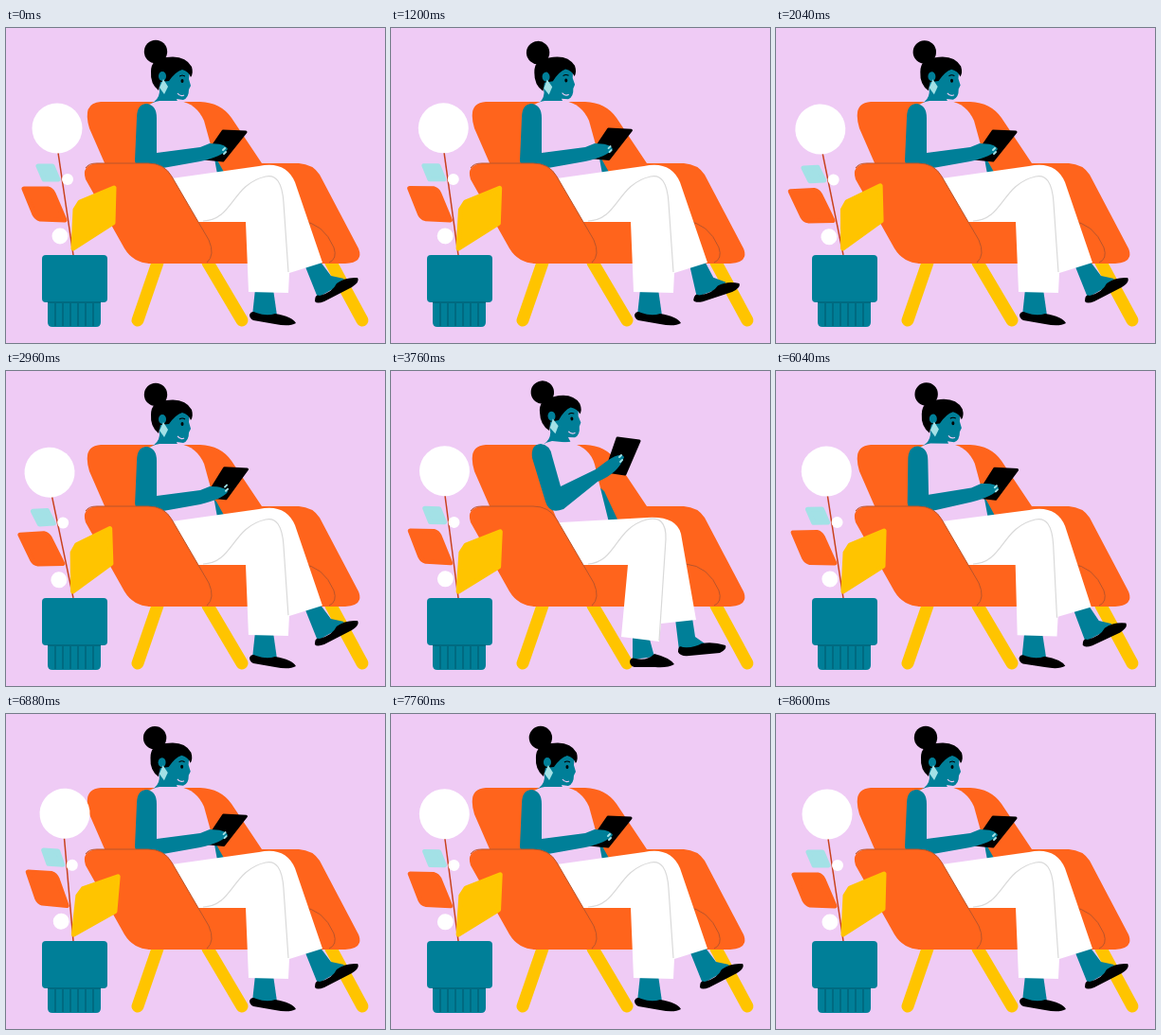
These frames come from a looping animation (400 px wide and 333 px high, 8640 ms). An HTML page:

```html
<!DOCTYPE html>
<html lang="en">
<head>
<meta charset="utf-8">
<title>Reading in an armchair</title>
<style>
  html, body { margin: 0; width: 100%; height: 100%; overflow: hidden; background: #efcbf5; }
  svg { display: block; width: 100vw; height: 100vh; }
  .orange { fill: #ff641c; }
  .teal { fill: #007f98; }
  .yellow { fill: #ffc400; }
  .lilac { fill: #efcbf5; }
  .pale { fill: #a3e1e6; }
  .white { fill: #fff; }
  .line { fill: none; stroke: #b9542b; stroke-width: 1; }
  .leaf { stroke-width: 5; stroke-linejoin: round; }
  .leg { fill: none; stroke: #ffc400; stroke-width: 13; stroke-linecap: round; }
</style>
</head>
<body>
<svg viewBox="0 0 400 333">
  <path class="leg" d="M160 248L139 309M213 248L249 309M343 248L376 309"/>
  <path class="orange" d="M100 78H205Q227 79 238 95L270 143H309Q324 144 331 155L372 233Q378 248 358 249H150L105 145L88 106Q80 79 100 78Z"/>
  <path class="line" d="M205 204H311Q335 206 346 232Q350 244 341 248"/>

  <path id="farArm" class="teal"/>
  <g id="upper">
    <g id="head">
      <circle cx="158" cy="25" r="12.2"/>
      <path class="teal" d="M161 48L162 68Q161 76 153 80H182L180 75L187 76Q193 74 193 65L195 61L193 54L194 44L175 38Z"/>
      <path d="M153 46Q153 32 169 31Q189 28 196 41Q198 48 195 52Q193 46 186 44Q179 46 172 56L163 57L161 66Q152 59 153 46Z"/>
      <ellipse class="teal" cx="165" cy="51" rx="4" ry="5"/>
      <ellipse cx="186" cy="56" rx="1.5" ry="2"/>
      <path d="M183 51Q186 49 189 51" fill="none" stroke="#000"/>
      <path d="M181 69Q184 73 188 71" fill="none" stroke="#efcbf5" stroke-width="1.2"/>
      <path class="pale" d="M166 54L171 62L167 70L162 63Z"/>
    </g>
    <path id="shirt" class="lilac"/>
  </g>

  <path id="nearAnkle" class="teal"/>
  <path id="nearShoe"/>
  <g id="foot">
    <path id="farAnkle" class="teal"/>
    <path id="farShoe"/>
  </g>
  <path id="pants" class="white"/>
  <path id="crease" fill="none" stroke="#d9d9d9" stroke-width="1.2"/>

  <g id="reach">
    <path id="tablet" stroke="#000" stroke-width="3" stroke-linejoin="round"/>
    <path id="arm" class="teal"/>
    <path id="nails" fill="none" stroke="#a3e1e6" stroke-width="2" stroke-linecap="round"/>
  </g>

  <path class="orange" d="M96 143H150Q167 143 175 157L214 224Q223 246 205 249H152Q134 248 125 233L84 160Q79 145 96 143Z"/>
  <path class="line" d="M84 148Q87 143 96 143H150Q167 143 175 157L214 224Q221 240 212 248"/>

  <g id="plant">
    <path d="M71 240L54 125" fill="none" stroke="#c8411c" stroke-width="1.5"/>
    <circle class="white" cx="54" cy="106" r="26.5"/>
    <path class="leaf pale" stroke="#a3e1e6" d="M34 146L49 146L55 160L40 160Z"/>
    <circle class="white" cx="65" cy="160" r="6"/>
    <path id="leftLeaf" class="leaf orange" stroke="#ff641c" d="M19 170L44 170Q48 171 50 175L62 203L36 202Q32 201 30 197Z"/>
    <path id="rightLeaf" class="leaf yellow" stroke="#ffc400" d="M78 184L114 169L113 206L71 233L73 192Z"/>
    <circle class="white" cx="57" cy="220" r="8.5"/>
  </g>
  <path class="teal" d="M44 288H100V311Q100 316 95 316H49Q44 316 44 311Z"/>
  <rect class="teal" x="38" y="240" width="69" height="50" rx="4"/>
  <path d="M44 290H100M52 291V315M60 291V315M68 291V315M76 291V315M84 291V315M92 291V315" fill="none" stroke="#00566b"/>
</svg>
<script>
const LOOP = 8640, STEP = 40;
const el = id => document.getElementById(id);

// Each part: [reclined pose, upright pose]
const body = {
  shirt: ["M148 83Q155 78 162 77L183 77Q201 80 209 98L220 138L224 160L178 162L158 140Z",
          "M158 79Q164 75 170 74L190 76Q210 81 215 99L222 128L230 160L178 164L168 140Z"],
  farArm: ["M216 132L222 138L232 156L222 158Z",
           "M219 122L225 127L240 159L228 159Z"],
  arm: ["M138 95Q138 80 149 80Q159 82 159 95L159 132L205 126L215 122Q231 122 234 128Q228 136 205 141L160 149Q137 152 136 140Z",
        "M149 92Q147 78 158 77Q168 78 170 90L179 122L216 104L228 95Q243 85 246 91Q240 108 218 117L182 146Q167 152 163 138Z"],
  pants: ["M168 160L267 146Q295 140 305 163L334 248L299 259L298 280L256 279L253 205L200 205Q188 195 168 160Z",
          "M162 161L270 155Q301 153 306 172L322 263L285 267L283 286L243 281L250 205L200 205Q188 195 162 161Z"],
  crease: ["M208 204C240 203 238 165 274 157Q291 153 293 185L298 258",
           "M208 204C238 202 236 166 270 157Q291 152 290 178L283 285"],
  nearAnkle: ["M263 276L282 276L286 304L260 304Z",
              "M255 278L272 280L278 302L255 305Z"],
  nearShoe: ["M257 303Q259 298 264 301Q275 305 284 302Q302 305 306 312Q299 316 284 313L261 309Q257 307 257 303Z",
             "M252 307Q253 302 258 304Q270 307 278 299Q294 303 299 310Q292 314 279 313L257 313Q252 312 252 307Z"],
  farAnkle: ["M315 250L331 246L343 262L357 265L350 273L329 285Z",
             "M300 262L318 261L321 281L331 288L322 293L304 295Z"],
  farShoe: ["M326 289Q326 281 331 283Q345 279 349 270Q358 263 371 264Q374 268 365 274L336 289Q328 292 326 289Z",
            "M303 297Q303 289 308 292Q320 293 328 288Q340 286 353 290Q355 294 347 298L315 301Q305 302 303 297Z"]
};
const device = {
  tablet: ["M229 109L253 110L229 140L209 138Z",
           "M239 71L262 74L247 109L227 106Z"],
  nails: ["M229 129L231 127M230 133L232 131",
          "M241 91L243 89M242 96L244 94"]
};

const lerp = (a, b, k) => a + (b - a) * k;
const smooth = k => k * k * (3 - 2 * k);

// Eased value of a [time, value, ...] track
function track(keys, t) {
  let i = 0;
  while (i + 2 < keys.length && keys[i + 2] <= t) i += 2;
  if (i + 2 >= keys.length) return keys[i + 1];
  const k = (t - keys[i]) / (keys[i + 2] - keys[i]);
  return lerp(keys[i + 1], keys[i + 3], smooth(k));
}

function morph(a, b, k) {
  const ends = b.match(/\d+/g);
  let i = 0;
  return a.replace(/\d+/g, n => lerp(+n, +ends[i++], k).toFixed(2));
}

function pose(parts, k) {
  for (const id in parts) el(id).setAttribute("d", morph(...parts[id], k));
}

const move = (id, value) => el(id).setAttribute("transform", value);

const tracks = {
  sit: [0, 0, 2930, 0, 3700, 1, 5380, 1, 6200, 0, LOOP, 0],
  reach: [0, 0, 1200, .05, 2000, 0, 2700, 0, 3700, 1, 5380, 1, 6250, 0, 6880, .05, 7700, 0, LOOP, 0],
  lean: [0, 0, 3700, 0, 4600, 1, 5400, 1, 6200, 0, LOOP, 0],
  nod: [0, 0, 1200, -3.3, 2700, 0, 6200, 0, 6880, -1, 8000, 0, LOOP, 0],
  foot: [0, 0, 450, -17, 1200, 9, 1800, 0, 2960, 0, 3180, -15, 3500, 0, LOOP, 0],
  sway: [0, 0, 500, 6, 2300, -8, 2960, -8, 4150, 6, 5800, -2, 6880, 8, 8250, 0, LOOP, 0],
  spread: [0, 0, 4300, 0, 5300, 1, 6400, 0, LOOP, 0]
};

function draw(t) {
  const v = {};
  for (const name in tracks) v[name] = track(tracks[name], t);

  pose(body, v.sit);
  pose(device, v.reach);

  const lean = `translate(0 ${158 - 2 * v.lean}) skewX(${-2 * v.lean}) translate(0 -158)`;
  move("upper", lean);
  move("reach", lean);
  move("head", `translate(${7 * v.sit} ${-4.5 * v.sit}) rotate(${v.nod - 6 * v.sit} 175 76)`);
  move("foot", `rotate(${v.foot * (1 - v.sit)} 331 245)`);

  move("plant", `rotate(${v.sway / 134 * 180 / Math.PI} 70 240)`);
  move("leftLeaf", `rotate(${-3 * v.spread} 64 204)`);
  move("rightLeaf", `rotate(${1.6 * v.spread} 70 236)`);
}

function frame(now) {
  draw(Math.floor(now % LOOP / STEP) * STEP);
  requestAnimationFrame(frame);
}
draw(0);
requestAnimationFrame(frame);
</script>
</body>
</html>
```
